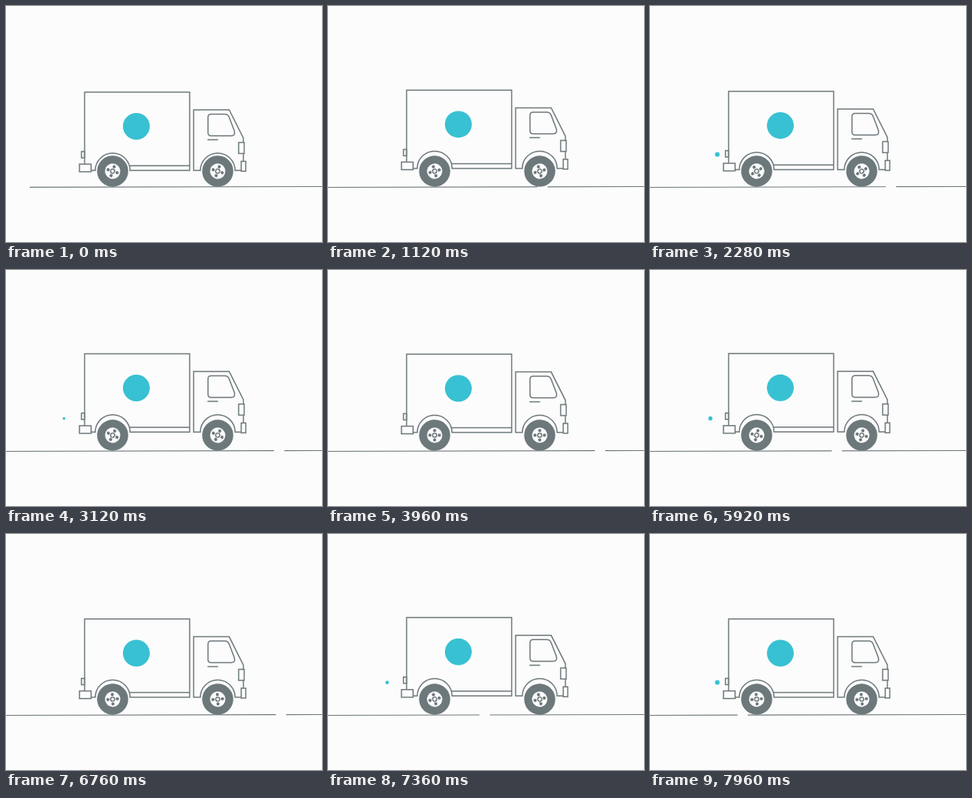
Animation, 400 px wide and 300 px high, one loop 8 s. Source, as an HTML page:

```html
<!DOCTYPE html>
<html lang="en">
<head>
<meta charset="utf-8">
<title>Delivery truck</title>
<style>
  html, body { margin: 0; width: 100%; height: 100%; overflow: hidden; background: #fcfcfc; }
  svg { display: block; width: 100%; height: 100%; }
  .line { fill: none; stroke: #6f7a7d; stroke-width: 1.5; }
  .accent { fill: #38c1d2; }
</style>
</head>
<body>
<svg viewBox="0 0 400 300">
  <defs>
    <g id="wheel">
      <circle r="19.7" fill="#6d787b"/>
      <circle r="9.7" fill="#fcfcfc"/>
      <circle r="2.6" class="line"/>
      <g fill="#6d787b">
        <circle cx="6" r="2"/><circle cx="-6" r="2"/>
        <circle cy="6" r="2"/><circle cy="-6" r="2"/>
      </g>
    </g>
  </defs>

  <path id="ground" class="line" style="stroke-width:1.2"/>
  <circle id="puff" class="accent" cy="188.7"/>

  <g id="body">
    <g class="line">
      <path d="M99.5 201V109.5H232.5V209H157A22 22 0 0 0 113 209H107.5M156 203H232.5"/>
      <rect x="95.5" y="185" width="4" height="8"/>
      <rect x="93" y="201" width="14.7" height="9.7"/>
      <path d="M298 209H290A22 22 0 0 0 246 209H237.5V132H282.5L300.5 168V173.5M300.5 187.5V197.5"/>
      <path d="M259.500 137.500H277Q280.800 137.500 282.300 141L289 158.500Q291 165 285 165H259.500Q255.700 165 255.700 161V141.500Q255.700 137.500 259.500 137.500Z"/>
      <path d="M255 170H268.500"/>
      <rect x="294.500" y="173.500" width="7" height="14"/>
      <rect x="297.700" y="197.500" width="5.800" height="12.500"/>
    </g>
    <circle class="accent" cx="165" cy="153" r="17"/>
  </g>

  <use href="#wheel" class="wheel" data-x="135"/>
  <use href="#wheel" class="wheel" data-x="268"/>
</svg>
<script>
  const LOOP = 8000;
  const DRIVE = 8260;        // ms from rest to rest
  const DISTANCE = 2783;
  const TURNS = 18;
  const GAP = 13;
  const SPAN = 400 + GAP;
  const BOUNCE = { every: 475, height: 1.6 };
  const PUFF = { every: 710, from: 50, life: 260 };

  const byId = id => document.getElementById(id);
  const ground = byId('ground'), body = byId('body'), puff = byId('puff');
  const wheels = document.querySelectorAll('.wheel');

  const smooth = u => u * u * (3 - 2 * u);
  const groundY = x => 230.5 - x / 400;
  const segment = (a, b) => b > a ? `M${a} ${groundY(a)}L${b} ${groundY(b)}` : '';

  function drawGround(travel) {
    const right = ((5 - travel) % SPAN + SPAN) % SPAN;
    // The road begins a little inside the stage when the truck sets off.
    const start = Math.max(0, 30 - travel);
    ground.setAttribute('d',
      segment(start, right - GAP) + segment(Math.max(start, right), 400));
  }

  function drawPuff(t) {
    const u = (t % PUFF.every - PUFF.from) / PUFF.life;
    const visible = u > 0 && u < 1;
    puff.setAttribute('r', visible ? 3 * Math.sqrt(Math.sin(Math.PI * u)) : 0);
    if (visible) puff.setAttribute('cx', 97 - 25 * (1 - (1 - u) ** 1.3));
  }

  function draw(t) {
    const progress = smooth(t / DRIVE);
    const lift = BOUNCE.height * (Math.cos(2 * Math.PI * t / BOUNCE.every) - 1);
    drawGround(DISTANCE * progress);
    drawPuff(t);
    body.setAttribute('transform', `translate(0 ${lift})`);
    for (const wheel of wheels) {
      wheel.setAttribute('transform',
        `translate(${wheel.dataset.x} 210) rotate(${19 + 360 * TURNS * progress})`);
    }
  }

  const begin = performance.now();
  function tick() {
    draw((performance.now() - begin) % LOOP);
    requestAnimationFrame(tick);
  }
  tick();
</script>
</body>
</html>
```
